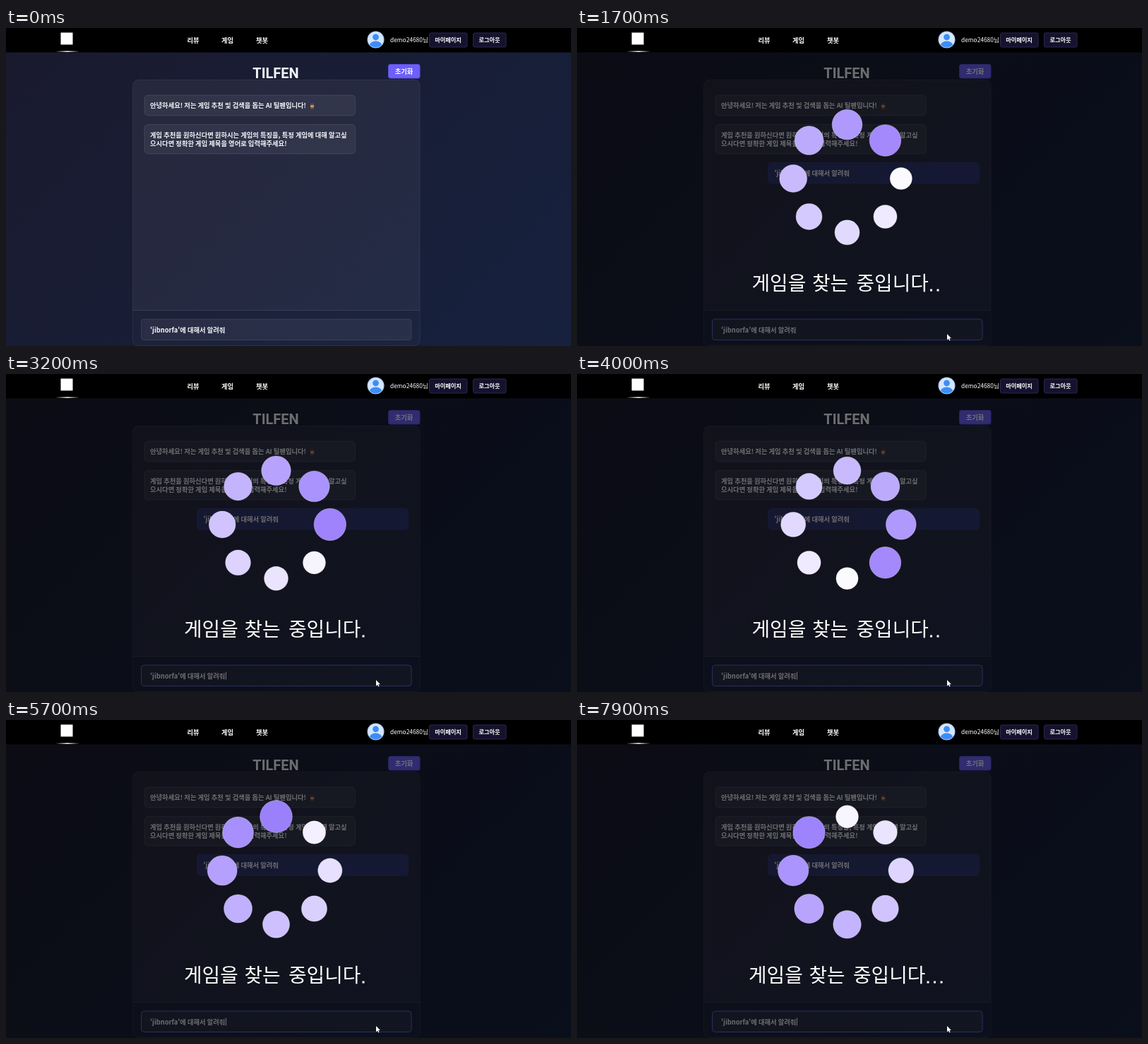
Recreate the animation shown at these times as an HTML page with a canvas. Size 800 by 450 pixels, loop 8000 ms.

```html
<!DOCTYPE html>
<html lang="ko">
<head>
<meta charset="utf-8">
<title>TILFEN</title>
<style>
html, body { margin: 0; width: 100%; height: 100%; overflow: hidden; background: #1a1a2e; }
canvas { display: block; }
</style>
</head>
<body>
<canvas id="stage" width="800" height="450"></canvas>
<script>
const ctx = document.getElementById('stage').getContext('2d');
const SANS = '"Noto Sans CJK KR", "Noto Sans CJK", sans-serif';
const LOOP = 8000, FOCUS_AT = 500, SENT_AT = 1300;
const QUESTION = "'jibnorfa'에 대해서 알려줘";
// Spinner lead position over time, in eighths of a turn.
const SPIN = [[1300, -8], [1700, 0.7], [3200, 33.3], [4800, 68.1], [5700, 87.1], [6700, 108.7], [7900, 134.35]];

function box(x, y, w, h, r, fill, stroke) {
  ctx.beginPath();
  ctx.roundRect(x, y, w, h, r);
  if (fill) { ctx.fillStyle = fill; ctx.fill(); }
  if (stroke) { ctx.strokeStyle = stroke; ctx.lineWidth = 1; ctx.stroke(); }
}

function disc(x, y, r, fill) {
  ctx.beginPath();
  ctx.arc(x, y, r, 0, Math.PI * 2);
  ctx.fillStyle = fill;
  ctx.fill();
}

function text(str, x, y, { size = 9.3, weight = 700, color = '#f4f4f8', align = 'left', family = SANS } = {}) {
  ctx.font = `${weight} ${size}px ${family}`;
  ctx.textAlign = align;
  ctx.fillStyle = color;
  ctx.fillText(str, x, y);
  return ctx.measureText(str).width;
}

function background() {
  const g = ctx.createLinearGradient(90, -87, 710, 537);
  g.addColorStop(0, '#1a1a2e');
  g.addColorStop(1, '#16213e');
  ctx.fillStyle = g;
  ctx.fillRect(0, 0, 800, 450);
}

function header() {
  ctx.fillStyle = '#000';
  ctx.fillRect(0, 0, 800, 34.5);
  ctx.fillStyle = '#fff';
  ctx.fillRect(77.5, 6.5, 17, 17);

  const glow = ctx.createLinearGradient(70, 0, 104, 0);
  glow.addColorStop(0, 'rgba(255,225,205,0)');
  glow.addColorStop(0.5, '#fff');
  glow.addColorStop(1, 'rgba(255,225,205,0)');
  ctx.fillStyle = glow;
  ctx.fillRect(70, 32.5, 34, 1.5);

  const nav = { align: 'center', color: '#fff' };
  text('리뷰', 265, 20.5, nav);
  text('게임', 313.5, 20.5, nav);
  text('챗봇', 362.5, 20.5, nav);

  disc(523.5, 16.5, 12, '#a9c9f5');
  ctx.save();
  ctx.beginPath();
  ctx.arc(523.5, 16.5, 11, 0, Math.PI * 2);
  ctx.clip();
  disc(523.5, 16.5, 11, '#d5e6fc');
  disc(523.5, 12.8, 4.4, '#3e8df5');
  ctx.beginPath();
  ctx.ellipse(523.5, 25.5, 9, 7, 0, 0, Math.PI * 2);
  ctx.fillStyle = '#3e8df5';
  ctx.fill();
  ctx.restore();

  text('demo24680님', 544, 20.3, { size: 8.4, weight: 500, color: '#fff' });
  const label = { size: 8.2, align: 'center', color: '#fff' };
  box(599.5, 7, 53.5, 20, 2, '#15122d', '#2b2750');
  text('마이페이지', 626, 20, label);
  box(661.5, 7, 46.5, 20, 2, '#15122d', '#2b2750');
  text('로그아웃', 684.5, 20, label);
}

function sleuth(x, y) {
  disc(x, y, 2.6, '#c39a68');
  ctx.fillStyle = '#5e4a3a';
  ctx.fillRect(x - 3, y - 2.5, 6, 1.2);
  ctx.fillRect(x - 2, y - 4, 4, 2);
  ctx.fillRect(x - 2.5, y + 2, 5, 2.5);
}

function chat(t) {
  const sent = t >= SENT_AT;
  const line = 'rgba(255,255,255,0.1)', pane = 'rgba(255,255,255,0.055)';
  text('TILFEN', 382, 70.5, { size: 20, align: 'center', family: 'Roboto, sans-serif' });
  box(541.5, 51.5, 44.5, 19.5, 2.5, '#6c5ffa', '#5d52dc');
  text('초기화', 563.5, 64.7, { color: '#fff' , align: 'center' });

  box(179.5, 73.5, 406.5, 376, 8, null, 'rgba(255,255,255,0.08)');
  box(179.5, 73.5, 406.5, 326, [8, 8, 0, 0], pane);
  box(179.5, 399.5, 406.5, 50, [0, 0, 8, 8], 'rgba(255,255,255,0.02)');
  ctx.fillStyle = line;
  ctx.fillRect(180, 399, 406, 1);

  box(196, 95, 298.5, 29, 5, pane, line);
  text('안녕하세요! 저는 게임 추천 및 검색을 돕는 AI 틸펜입니다!', 204, 113);
  sleuth(433.5, 110.5);
  box(196, 136.5, 298.5, 41.5, 5, pane, line);
  text('게임 추천을 원하신다면 원하시는 게임의 특징을, 특정 게임에 대해 알고싶', 204, 155);
  text('으시다면 정확한 게임 제목을 영어로 입력해주세요!', 204, 167);

  if (sent) {
    box(270.5, 190.5, 299, 29.5, 5, 'rgba(72,82,215,0.3)', 'rgba(100,110,240,0.16)');
    text(QUESTION, 279.5, 208.7);
  }

  const focused = t >= FOCUS_AT;
  box(191.5, 412, 382.5, 29.5, 4, pane, focused ? '#5a68da' : line);
  const w = text(QUESTION, 204, 430.5);
  if (focused && (t - 40) % 350 < 175) {
    ctx.fillStyle = '#fff';
    ctx.fillRect(Math.round(204 + w) + 1, 421.5, 1, 11);
  }
}

function spinPos(t) {
  let i = 1;
  while (i < SPIN.length - 1 && t > SPIN[i][0]) i++;
  const [t0, p0] = SPIN[i - 1], [t1, p1] = SPIN[i];
  return p0 + (p1 - p0) * (t - t0) / (t1 - t0);
}

function spinner(t) {
  const pos = spinPos(t);
  for (let k = 0; k < 8; k++) {
    const age = (((pos - k) % 8) + 8) % 8 / 8;
    const angle = (k - 1) * Math.PI / 4;
    const mix = c => Math.round(c + (255 - c) * age);
    disc(382.5 + 76.3 * Math.cos(angle), 213 + 76.3 * Math.sin(angle), 23 - 7.67 * age,
      `rgb(${mix(154)},${mix(126)},${mix(252)})`);
    ctx.strokeStyle = 'rgba(255,255,255,0.35)';
    ctx.lineWidth = 0.8;
    ctx.stroke();
  }
}

function loadingText(t) {
  const dots = Math.floor((t - SENT_AT + 530) / 200) % 3 + 1;
  const x = 252 - (dots - 1) * 4.5;
  const style = { size: 27.8, weight: 500, color: '#fff' };
  text('게임을', x, 371, style);
  text('찾는', x + 85.5, 371, style);
  text('중입니다', x + 148, 371, style);
  ctx.fillStyle = '#fff';
  for (let i = 0; i < dots; i++) ctx.fillRect(x + 252.5 + i * 9.5, 369.5, 3, 3);
}

function pointer(x, y) {
  ctx.beginPath();
  [[0, 0], [0, 8.5], [2, 6.8], [3.3, 9.6], [4.6, 9], [3.4, 6.3], [5.9, 6.1]]
    .forEach(([dx, dy]) => ctx.lineTo(x + dx, y + dy));
  ctx.closePath();
  ctx.strokeStyle = '#111';
  ctx.lineWidth = 1;
  ctx.stroke();
  ctx.fillStyle = '#fff';
  ctx.fill();
}

function draw(t) {
  background();
  chat(t);
  if (t >= SENT_AT) {
    ctx.fillStyle = 'rgba(0,0,0,0.55)';
    ctx.fillRect(0, 34, 800, 416);
    spinner(t);
    loadingText(t);
  }
  header();
  if (t >= FOCUS_AT) pointer(524, 433);
}

const start = performance.now();
function tick(now) {
  const t = Math.max(0, now - start) % LOOP;
  draw(Math.floor(t / 100) * 100);
  requestAnimationFrame(tick);
}
draw(0);
requestAnimationFrame(tick);
</script>
</body>
</html>
```
